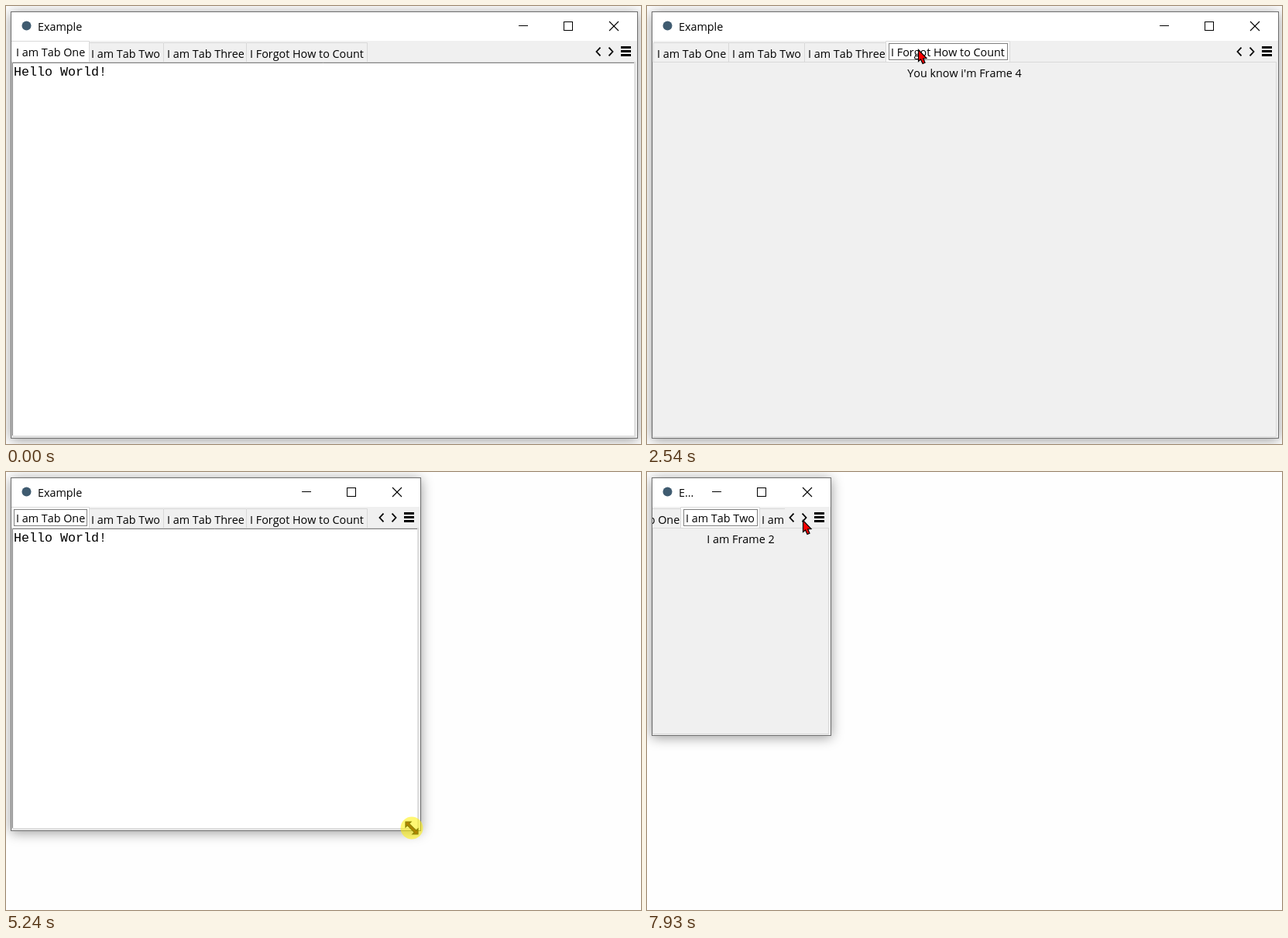
Recreate the animation shown at these times as an HTML page with a canvas. Size 820x566 px, loop 8 s.

```html
<!DOCTYPE html>
<html lang="en">
<head>
<meta charset="utf-8">
<title>Tabbed window</title>
<style>
  html, body { margin: 0; width: 100%; height: 100%; overflow: hidden; background: #fefefe; }
  canvas { display: block; width: 820px; height: 566px; }
</style>
</head>
<body>
<canvas id="stage" width="820" height="566"></canvas>
<script>
const ctx = document.getElementById('stage').getContext('2d');
const LOOP = 8000, STEP = 1000 / 13;
const UI = '14.35px "Open Sans", "Noto Sans", sans-serif';
const MONO = '16.67px "Liberation Mono", "Courier New", monospace';
const FACE = '#f0f0f0', EDGE = '#d9d9d9', INK = '#000';

const tabs = [
  { label: 'I am Tab One', width: 97 },
  { label: 'I am Tab Two', width: 98, body: 'I am Frame 2' },
  { label: 'I am Tab Three', width: 107, body: 'I am Frame 3' },
  { label: 'I Forgot How to Count', width: 156, body: "You know i'm Frame 4" }
];
tabs.reduce((left, tab) => {
  tab.left = left;
  return tab.right = left + tab.width;
}, 8);

// The pointer glides to a point, then may press there and open a tab.
const acts = [
  { from: 230, until: 1000, to: [166, 62], press: 1070, tab: 1 },
  { from: 1230, until: 1460, to: [252, 62], press: 1600, tab: 2 },
  { from: 1760, until: 2000, to: [350, 56], press: 2300, tab: 3 },
  { from: 2540, until: 3080, to: [52, 55], press: 3150, tab: 0 },
  { from: 3300, until: 4600, to: [821, 563] },
  { from: 4850, until: 5930, drag: true, press: 4770, hold: 1160 },
  { from: 6160, until: 6520, to: [106, 75] },
  { from: 6560, until: 6770, to: [122, 61], press: 6840, tab: 1 },
  { from: 7010, until: 7390, to: [201, 62], press: 7530, hold: 330, scroll: 60 }
];
const dragging = acts.find(act => act.drag);
const scrolling = acts.find(act => act.scroll);

const ramp = (t, from, until) => Math.min(1, Math.max(0, (t - from) / (until - from)));
const easeOut = (p, power) => 1 - (1 - p) ** power;
const mix = (a, b, p) => Math.round(a + (b - a) * p);

function windowSize(t) {
  const p = ramp(t, dragging.from, dragging.until);
  return [mix(816, 238, easeOut(p, 1.525)), mix(559, 341, easeOut(p, 1.32))];
}

function pointerAt(t, right, bottom) {
  return acts.filter(act => act.from <= t).reduce(([x, y], act) => {
    if (act.drag) return [right - 12, bottom - 4];
    const p = easeOut(ramp(t, act.from, act.until), 3);
    return [mix(x, act.to[0], p), mix(y, act.to[1], p)];
  }, [812, 176]);
}

const isPressed = t => acts.some(({ press, hold = 150 }) => t >= press && t < press + hold);

function openTab(t) {
  return acts.reduce((open, act) => act.tab !== undefined && act.press <= t ? act.tab : open, 0);
}

function box(color, x, y, w, h) {
  ctx.fillStyle = color;
  ctx.fillRect(x, y, w, h);
}

// one-pixel outline through the given inclusive pixel corners
function outline(color, x0, y0, x1, y1) {
  ctx.strokeStyle = color;
  ctx.lineWidth = 1;
  ctx.strokeRect(x0 + .5, y0 + .5, x1 - x0, y1 - y0);
}

function line(points, width, color = INK) {
  ctx.beginPath();
  points.forEach(([x, y]) => ctx.lineTo(x, y));
  ctx.lineWidth = width;
  ctx.strokeStyle = color;
  ctx.stroke();
}

function disc(color, x, y, radius) {
  ctx.fillStyle = color;
  ctx.beginPath();
  ctx.arc(x, y, radius, 0, 2 * Math.PI);
  ctx.fill();
}

function polygon(points, fill) {
  ctx.beginPath();
  points.forEach(([x, y]) => ctx.lineTo(x, y));
  ctx.closePath();
  ctx.fillStyle = fill;
  ctx.fill();
  ctx.lineWidth = 1.2;
  ctx.strokeStyle = INK;
  ctx.stroke();
}

function text(str, x, y, font = UI, align = 'left') {
  ctx.font = font;
  ctx.fontKerning = 'none';
  ctx.textAlign = align;
  ctx.fillStyle = INK;
  ctx.fillText(str, x, y);
}

function clipped(x, y, w, h, draw) {
  ctx.save();
  ctx.beginPath();
  ctx.rect(x, y, w, h);
  ctx.clip();
  draw();
  ctx.restore();
}

function shortened(str, room) {
  ctx.font = UI;
  const fits = s => ctx.measureText(s).width <= room;
  if (fits(str)) return str;
  let keep = str.length - 1;
  while (keep > 1 && !fits(str.slice(0, keep) + '...')) keep--;
  return str.slice(0, keep) + '...';
}

function drawWindow(right, bottom) {
  ctx.save();
  ctx.shadowColor = 'rgba(0,0,0,.4)';
  ctx.shadowBlur = 15;
  ctx.shadowOffsetY = 2;
  box('#fff', 6, 7, right - 6, bottom - 7);
  ctx.restore();
  box(FACE, 7, 45, right - 8, bottom - 46);
  outline('#6e6e6e', 6, 7, right - 1, bottom - 1);

  disc('#3f5b70', 26.5, 25.5, 6);
  text(shortened('Example', right - 217), 41, 32);

  box(INK, right - 154, 25, 12, 1);
  outline(INK, right - 96, 20, right - 85, 31);
  for (const dir of [-1, 1]) line([[right - 31 - 6 * dir, 20], [right - 31 + 6 * dir, 32]], 1.1);
}

function drawTab(tab, { selected, hovered, focused }) {
  const grow = selected ? 2 : 0;
  const x0 = tab.left - grow, x1 = tab.right + grow, y0 = 47 - grow;
  box(selected ? '#fff' : hovered ? '#d8eaf9' : FACE, x0, y0, x1 - x0 + 1, 25 + grow);
  line([[x0 + .5, 72], [x0 + .5, y0 + .5], [x1 + .5, y0 + .5], [x1 + .5, 72]], 1, EDGE);
  if (focused) {
    ctx.setLineDash([1, 1]);
    outline(INK, tab.left + 2, 48, tab.right - 1, 69);
    ctx.setLineDash([]);
  }
  text(tab.label, tab.left + 5, 67 - grow);
}

function drawTabBar(right, current, scroll, focused, px, py) {
  const end = right - 60;
  clipped(7, 45, end - 7, 28, () => {
    ctx.translate(-scroll, 0);
    const overBar = py >= 47 && py < 72 && px < end;
    for (const tab of tabs) {
      const hovered = overBar && px + scroll > tab.left && px + scroll <= tab.right;
      if (tab !== current) drawTab(tab, { hovered });
    }
    drawTab(current, { selected: true, focused });
  });
  for (const dir of [-1, 1]) {
    const x = right - 43 + 8 * dir;
    line([[x - 2.5 * dir, 53.7], [x + 2.5 * dir, 59], [x - 2.5 * dir, 64.3]], 1.8);
  }
  for (let y = 52; y <= 62; y += 5) box(INK, right - 22, y, 13, 3);
}

function drawPage(right, bottom, current) {
  if (current.body) {
    text(current.body, (right + 4) / 2, 92, UI, 'center');
    return;
  }
  const x1 = right - 5, y1 = bottom - 4;
  box('#fff', 8, 73, x1 - 7, y1 - 72);
  outline('#e3e3e3', 8, 73, x1, y1);
  line([[8.5, y1], [8.5, 73.5], [x1, 73.5]], 1, '#808080');
  clipped(9, 74, x1 - 9, y1 - 74, () => text('Hello World!', 10, 90, MONO));
}

const pointers = {
  arrow() {
    polygon([[.5, .5], [.5, 15.5], [3.5, 13], [6, 18.5], [9, 17.2], [6.7, 11.8], [11, 11.5]], '#f00');
  },
  beam() {
    box('#b00000', -1, -7, 3, 15);
    for (const y of [-8, 7]) box(INK, -5, y, 11, 2);
  },
  resize(pressed) {
    const half = [[-8, -1], [-8, -8], [-1, -8], [-3.3, -5.7], [5.7, 3.3]];
    const mirrored = half.map(([x, y]) => [-x, -y]);
    polygon([...half, ...mirrored], pressed ? '#500000' : '#f00');
  }
};

function drawPointer(t, x, y, current, pressed) {
  const resizing = t > 4150 && t < 6160;
  const inText = !current.body && y >= 73;
  ctx.save();
  ctx.translate(x, y);
  pointers[resizing ? 'resize' : inText ? 'beam' : 'arrow'](pressed);
  if (pressed) disc('rgba(255,240,0,.55)', 0, 0, 14.5);
  ctx.restore();
}

function render(t) {
  const [right, bottom] = windowSize(t);
  const [px, py] = pointerAt(t, right, bottom);
  const current = tabs[openTab(t)];
  const scroll = mix(0, scrolling.scroll, ramp(t, scrolling.press, scrolling.press + scrolling.hold));

  box('#fefefe', 0, 0, 820, 566);
  drawWindow(right, bottom);
  outline(EDGE, 7, 72, right - 4, bottom - 3);
  drawTabBar(right, current, scroll, t >= acts[0].press, px, py);
  drawPage(right, bottom, current);
  if (t >= acts[0].from) drawPointer(t, px, py, current, isPressed(t));
}

const began = performance.now();
function tick() {
  const t = (performance.now() - began) % LOOP;
  render(Math.floor((t + 5) / STEP) * STEP);
  requestAnimationFrame(tick);
}
tick();
</script>
</body>
</html>
```
